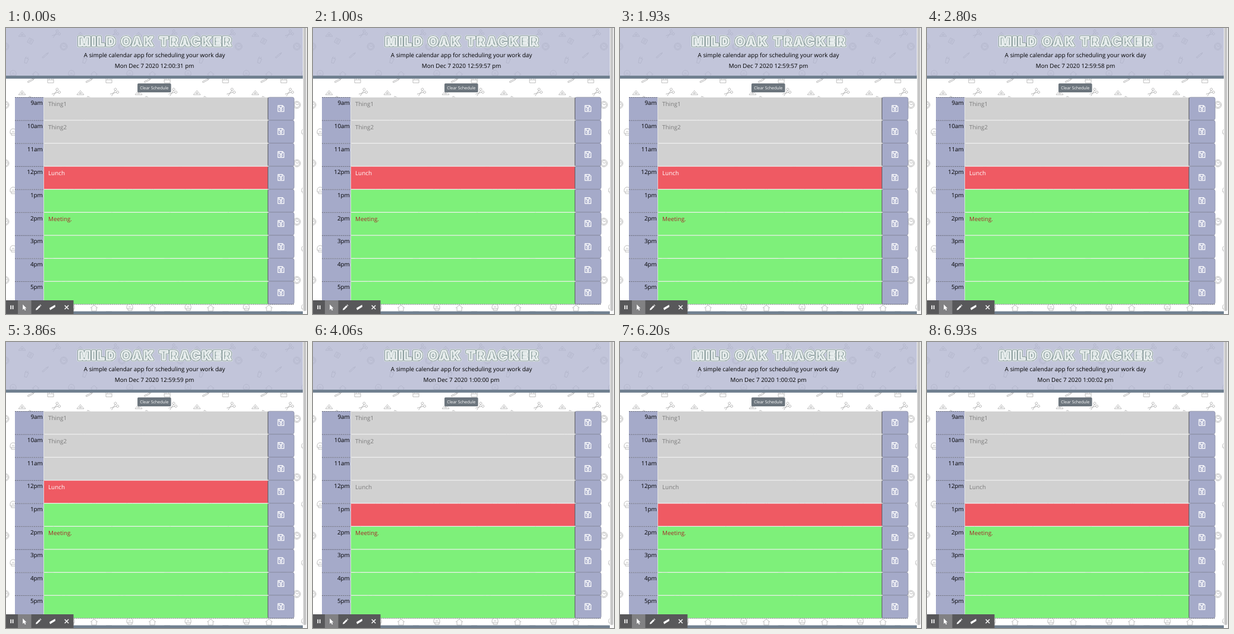
An HTML page with a canvas for the animation above (7000 ms loop, 506 px wide and 480 px high).

```html
<!DOCTYPE html>
<html lang="en">
<head>
<meta charset="utf-8">
<title>Day schedule</title>
<style>
  html, body { margin: 0; width: 100%; height: 100%; overflow: hidden; background: #fff; }
  canvas { display: block; }
</style>
</head>
<body>
<canvas id="stage" width="506" height="480"></canvas>
<script>
const ctx = document.getElementById('stage').getContext('2d');
const LOOP = 7000;
const TILE = 98;
const ROW_TOP = 116.2;
const ROW_STEP = 38.63;
const FAMILY = '"Open Sans", "Noto Sans", sans-serif';
const BODY_FONT = `9.85px ${FAMILY}`;
const LILAC = '#a5aac9';
const SLATE = '#708090';

const ticks = [
  [0, '12:00:31'], [60, '12:59:56'], [1000, '12:59:57'], [2000, '12:59:58'],
  [3000, '12:59:59'], [4060, '1:00:00'], [5060, '1:00:01'], [6200, '1:00:02']
];
const hours = ['9am', '10am', '11am', '12pm', '1pm', '2pm', '3pm', '4pm', '5pm'];
const notes = { 0: 'Thing1', 1: 'Thing2', 3: 'Lunch', 5: 'Meeting.' };
const looks = {
  past: { fill: '#d1d1d1', ink: '#7c7c7c' },
  present: { fill: '#ef5a63', ink: '#fff' },
  future: { fill: '#7ef07a', ink: '#a52a2a' }
};

function box(x, y, w, h, fill) {
  ctx.fillStyle = fill;
  ctx.fillRect(x, y, w, h);
}

function rounded(x, y, w, h, r, fill) {
  ctx.fillStyle = fill;
  ctx.beginPath();
  ctx.roundRect(x, y, w, h, r);
  ctx.fill();
}

function write(text, x, y, color, align = 'center', font = BODY_FONT) {
  ctx.font = font;
  ctx.textAlign = align;
  ctx.fillStyle = color;
  ctx.fillText(text, x, y);
}

function line(color, width, ...points) {
  ctx.strokeStyle = color;
  ctx.lineWidth = width;
  ctx.beginPath();
  points.forEach(([x, y]) => ctx.lineTo(x, y));
  ctx.stroke();
}

function dotted(x1, x2, y) {
  ctx.setLineDash([2, 1.2]);
  line('#51535f', .8, [x1, y], [x2, y]);
  ctx.setLineDash([]);
}

function at(x, y, angle, draw) {
  ctx.save();
  ctx.translate(x, y);
  ctx.rotate(angle);
  draw();
  ctx.restore();
}

function path(data, fill) {
  const shape = new Path2D(data);
  if (fill) {
    ctx.fillStyle = fill;
    ctx.fill(shape);
  } else {
    ctx.stroke(shape);
  }
}

// Stationery doodles: x, y, angle and outline within one tile.
const doodles = [
  [-1, 31, 0, 'M6 0A6 6 0 1 1-6 0A6 6 0 1 1 6 0M4.3 0A4.3 4.3 0 1 1-4.3 0A4.3 4.3 0 1 1 4.3 0M-2-2L0 0L3-1'],
  [12, 77, 0, 'M-5 2V-1A5 5 0 0 1 5-1V2ZM-3 2V5H4V2M-2-1H2'],
  [27, 11, 0, 'M-6 3L0-4L6 3ZM-2 1L0-1L2 1Z'],
  [42, 88, -.5, 'M-6-1H4V1H-6ZM4-1L7 0L4 1'],
  [75, 88, 0, 'M-5-4H5V4H-5ZM-5-1H5M-2-4V-1M2-4V-1'],
  [83, 11, -.65, 'M-6-2L5 2M-6 2L5-2M8 3A2 2 0 1 1 4 3A2 2 0 1 1 8 3M8-3A2 2 0 1 1 4-3A2 2 0 1 1 8-3'],
  [50, 78, 0, 'M-6 0L0-5L6 0M-4-1V5H4V-1'],
  [41, 22, .5, 'M-4-4H4V4H-4ZM-2-2H2M-2 0H2M-2 2H2'],
  [66, 46, -.7, 'M-6-1H4V1H-6ZM4-1L7 0L4 1'],
  [34, 55, .3, 'M-3-4H3L2 4H-2ZM-2-4V-7M1-4V-7']
];

function drawPattern() {
  ctx.strokeStyle = '#a9a9a9';
  ctx.lineWidth = .75;
  for (let y = 0; y < 480; y += TILE) {
    for (let x = 0; x < 500; x += TILE) {
      doodles.forEach(([dx, dy, angle, data]) => at(x + dx, y + dy, angle, () => path(data)));
    }
  }
}

function drawTitle() {
  const text = 'MILD OAK TRACKER';
  const outline = (color, width) => {
    ctx.strokeStyle = color;
    ctx.lineWidth = width;
    ctx.strokeText(text, 251.5, 30.2);
  };
  ctx.save();
  ctx.font = '900 21px Inter, "Open Sans", sans-serif';
  ctx.letterSpacing = '3px';
  ctx.textAlign = 'center';
  ctx.lineJoin = 'round';
  outline('#e6ecec', 6);
  outline('#778b8c', 4.6);
  ctx.fillStyle = '#8a9e9c';
  ctx.fillText(text, 251.5, 30.2);
  outline('#e6ecec', 3);
  ctx.restore();
}

function drawHeader(clock) {
  box(0, 0, 499, 80, 'rgba(179, 183, 209, .8)');
  box(0, 80, 499, 5, SLATE);
  drawTitle();
  write('A simple calendar app for scheduling your work day', 249.5, 49.2, '#000');
  write(`Mon Dec 7 2020 ${clock} pm`, 249.5, 67, '#000');
  rounded(221, 93, 56.5, 15, 1.7, '#6c757d');
  write('Clear Schedule', 249.2, 103, '#fff', 'center', `500 6.95px ${FAMILY}`);
}

function drawSaveIcon(x, y) {
  at(x, y, 0, () => {
    ctx.strokeStyle = '#fff';
    ctx.lineWidth = 1.25;
    ctx.lineJoin = 'round';
    path('M-5-5H2.5L5-2.5V5H-5ZM-3-5V-1.5H2V-5M1.6 1.7A1.6 1.6 0 1 1-1.6 1.7A1.6 1.6 0 1 1 1.6 1.7');
  });
}

function drawRow(index, current) {
  const y = ROW_TOP + index * ROW_STEP;
  const look = looks[index < current ? 'past' : index === current ? 'present' : 'future'];
  box(15, y, 48.5, ROW_STEP, LILAC);
  box(63.2, y, 377, ROW_STEP, '#eee');
  box(63.8, y + .6, 376.2, ROW_STEP - 1.2, look.fill);

  rounded(440.3, y, 44, ROW_STEP - .3, 3, LILAC);
  ctx.strokeStyle = '#777b91';
  ctx.lineWidth = .6;
  ctx.stroke();
  line('#444', .7, [440.4, y + .5], [440.4, y + ROW_STEP - .5]);

  dotted(15, 63.5, y + .3);
  write(hours[index], 61.7, y + 13.2, '#000', 'right');
  if (notes[index]) write(notes[index], 71, y + 15, look.ink, 'left');
  drawSaveIcon(462.2, y + 18.8);
}

function drawToolbar() {
  box(0, 457, 113.5, 23, '#58585a');
  box(20, 457, 22.5, 23, '#818183');
  box(7.4, 465.5, 1.7, 6.5, '#fff');
  box(10.8, 465.5, 1.7, 6.5, '#fff');
  at(31, 469, 0, () => path('M-2.8-5L3.5 1.4H.8L2.4 4.6L.8 5.3L-.7 2L-2.8 4Z', '#fff'));
  at(54.5, 469, 0, () => path('M-4.5 4.5L-4 2L1.5-3.5L3.5-1.5L-2 4ZM2.2-4.2L3-5L5-3L4.2-2.2Z', '#fff'));
  at(78, 469, 0, () => path('M-5 1L4.5-4.5L5-1L-3.8 4.5Z', '#fff'));
  line('#fff', 1.4, [98.7, 465.5], [105.2, 472]);
  line('#fff', 1.4, [105.2, 465.5], [98.7, 472]);
}

function render(time) {
  const [start, clock] = ticks.findLast(([from]) => time >= from);
  const current = start >= 4060 ? 4 : 3;
  ctx.textRendering = 'geometricPrecision';
  box(0, 0, 506, 480, '#fff');
  drawPattern();
  drawHeader(clock);
  hours.forEach((_, index) => drawRow(index, current));
  dotted(15, 484, ROW_TOP + hours.length * ROW_STEP);
  box(0, 475.5, 499, 4.5, SLATE);
  box(499, 0, 7, 480, '#fafafa');
  rounded(499.9, -4, 4.8, 479, 2, '#c6c6c6');
  drawToolbar();
}

const began = performance.now();
function tick() {
  render((performance.now() - began) % LOOP);
  requestAnimationFrame(tick);
}
tick();
</script>
</body>
</html>
```
